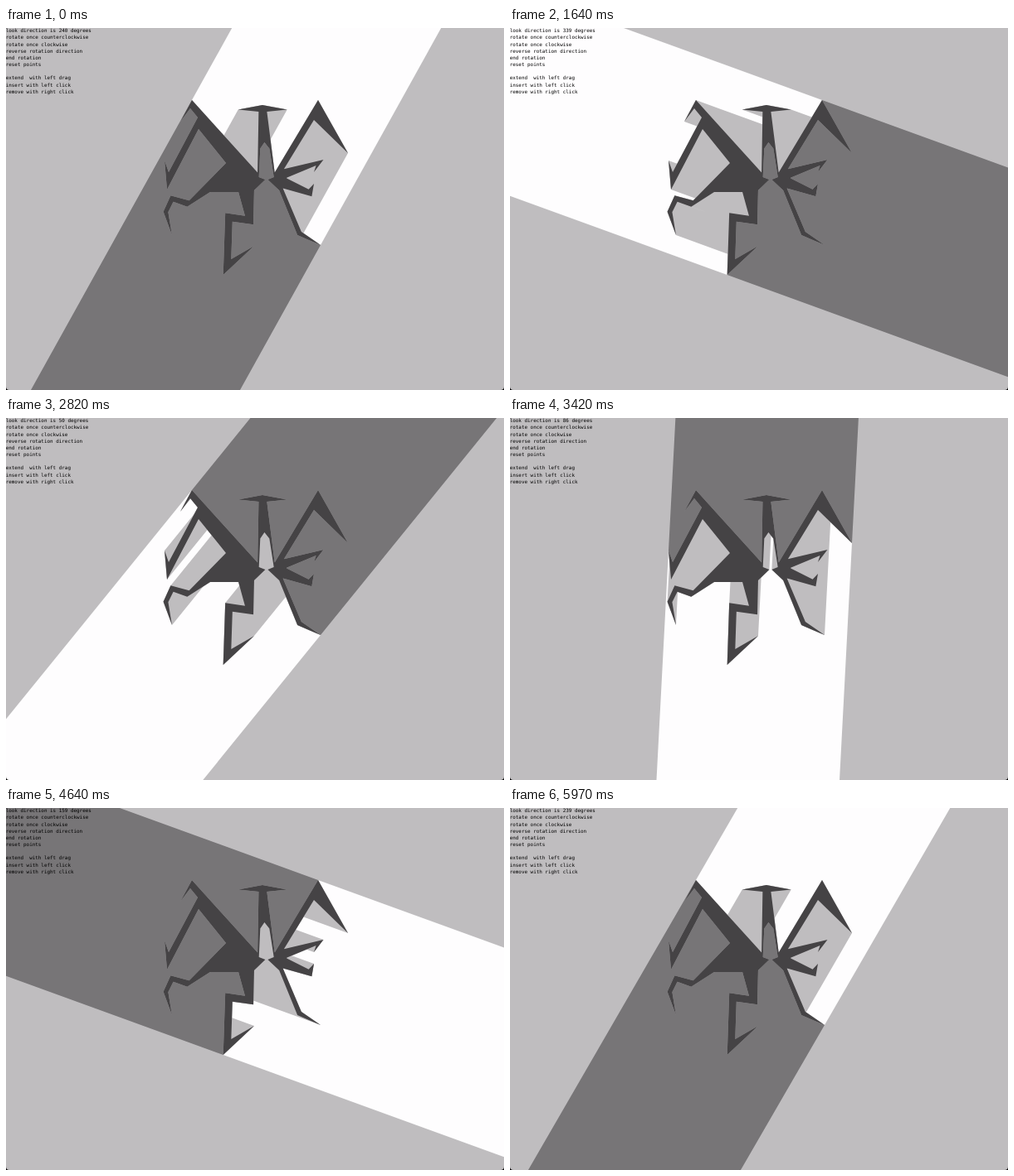
Recreate the animation shown at these times as an HTML page. Size 600 by 437 pixels, loop 6 s.

```html
<!DOCTYPE html>
<html lang="en">
<head>
<meta charset="utf-8">
<title>Look direction</title>
<style>
  html, body { margin: 0; width: 100%; height: 100%; overflow: hidden; background: #bfbdbf; }
  svg { display: block; width: 600px; height: 437px; }
  text {
    font: 5.92px "DejaVu Sans Mono", "Liberation Mono", monospace;
    white-space: pre;
    text-rendering: geometricPrecision;
  }
</style>
</head>
<body>
<svg viewBox="0 0 600 437">
  <rect width="600" height="437" fill="#bfbdbf"/>
  <path id="visible" fill="#fefdfe"/>
  <path id="hidden" fill="#bfbdbf"/>
  <path id="behind" fill="#777577"/>
  <path id="body" fill="#454345"/>
  <g id="labels"></g>
  <path d="M0 433Q0 437 4 437H0ZM600 433Q600 437 596 437H600Z"/>
</svg>
<script>
const LOOP = 6000;
const FRAMES_PER_MS = 0.033;
const DEGREES_PER_FRAME = 20 / 11;
const FAR = 1200;

// Mirrors a profile of [half width, y] about the slightly leaning mast axis.
function symmetric(profile, firstSide) {
  const place = side => ([half, y]) => [309.2 + (y - 98) * 0.055 + side * half, y];
  return [...profile.map(place(firstSide)), ...profile.slice().reverse().map(place(-firstSide))];
}

// A bent stroke through joints of [x, y, width], mitred at the bends and pointed at the end.
function limb(tip, ...joints) {
  const spine = [...joints, tip];
  const normals = joints.map(([x, y], i) => {
    const dx = spine[i + 1][0] - x, dy = spine[i + 1][1] - y;
    const length = Math.hypot(dx, dy);
    return [dy / length, -dx / length];
  });
  const edge = side => joints.map(([x, y, width], i) => {
    const before = normals[Math.max(0, i - 1)], after = normals[i];
    const mx = before[0] + after[0], my = before[1] + after[1];
    const reach = side * width / (mx * mx + my * my);
    return [x + mx * reach, y + my * reach];
  });
  return [...edge(1), tip, ...edge(-1).reverse()];
}

const mast = symmetric([[10.3, 174.5], [5, 101], [29.5, 98.5], [0, 93]], -1);
const slot = symmetric([[1.5, 183], [9, 180], [5.5, 145.5], [0, 138]], 1);
const rightWing = [[376, 87], [412, 151], [371, 111]];
const upperFinger = limb([371, 174], [336.5, 175.5, 11], [378, 162.5, 4]);
const lowerFinger = limb([371, 188], [336, 187.5, 13], [366.5, 199, 6.7]);
const rightLeg = limb([379, 262], [331.5, 195, 5], [353.5, 248, 6]);
const leftLeg = limb([299, 263], [289.5, 197, 19], [293, 232, 9], [268.5, 228.5, 9], [266.5, 288.5, 9]);
const leftArm = limb([200, 250], [219.5, 212, 8], [200, 206, 6], [192.5, 222, 5.5]);
const leftWing = [[265, 163], [232, 122], [194, 195], [191, 160], [196, 174], [231, 108], [222, 97], [210, 113]];

// The whole figure, clockwise on screen from the left shoulder.
const outline = [
  [224, 87], ...mast, ...rightWing, ...upperFinger, ...lowerFinger, ...rightLeg,
  ...slot, ...leftLeg, [246, 198], ...leftArm, ...leftWing
];

const lines = [
  "", "rotate once counterclockwise", "rotate once clockwise", "reverse rotation direction",
  "end rotation", "reset points", "", "extend  with left drag", "insert with left click",
  "remove with right click"
];

const byId = id => document.getElementById(id);
const toPath = points => "M" + points.map(([x, y]) => x.toFixed(2) + " " + y.toFixed(2)).join("L") + "Z";
const setPath = (id, d) => byId(id).setAttribute("d", d);

const labels = lines.map((line, i) => {
  const text = document.createElementNS("http://www.w3.org/2000/svg", "text");
  text.setAttribute("x", -0.3);
  text.setAttribute("y", 5.3 + i * 8.15);
  text.textContent = line;
  return byId("labels").appendChild(text);
});

function chain(from, to) {
  const points = [outline[from]];
  for (let i = from; i !== to;) {
    i = (i + 1) % outline.length;
    points.push(outline[i]);
  }
  return points;
}

function draw(degrees) {
  const angle = degrees * Math.PI / 180;
  const dx = Math.cos(angle), dy = -Math.sin(angle);
  const push = ([x, y], distance) => [x + dx * distance, y + dy * distance];
  const region = (points, distance) =>
    toPath([...points, push(points[points.length - 1], distance), push(points[0], distance)]);

  // The two outermost points across the view split the outline into front and back.
  const across = outline.map(([x, y]) => dx * y - dy * x);
  const low = across.indexOf(Math.min(...across));
  const high = across.indexOf(Math.max(...across));
  setPath("visible", region(chain(high, low), -FAR));
  setPath("behind", region(chain(low, high), FAR));

  // Every edge casts a shadow; equal winding lets them merge into one fill.
  const shadows = outline.map((p, i) => {
    const j = (i + 1) % outline.length;
    return across[i] < across[j] ? region([p, outline[j]], FAR) : region([outline[j], p], FAR);
  });
  setPath("hidden", shadows.join(""));
}

let shown = -1;
function update(now) {
  const time = now % LOOP;
  const frame = Math.floor((Math.floor(time / 10) * 10 + 5) * FRAMES_PER_MS);
  if (frame !== shown) {
    shown = frame;
    const degrees = 240 + Math.ceil(frame * DEGREES_PER_FRAME);
    labels[0].textContent = `look direction is ${degrees % 360} degrees`;
    draw(degrees + 1); // the label trails the view by one step
  }
}

let start = null;
function tick(now) {
  if (start === null) start = now;
  update(now - start);
  requestAnimationFrame(tick);
}

setPath("body", toPath(outline));
update(0);
requestAnimationFrame(tick);
</script>
</body>
</html>
```
